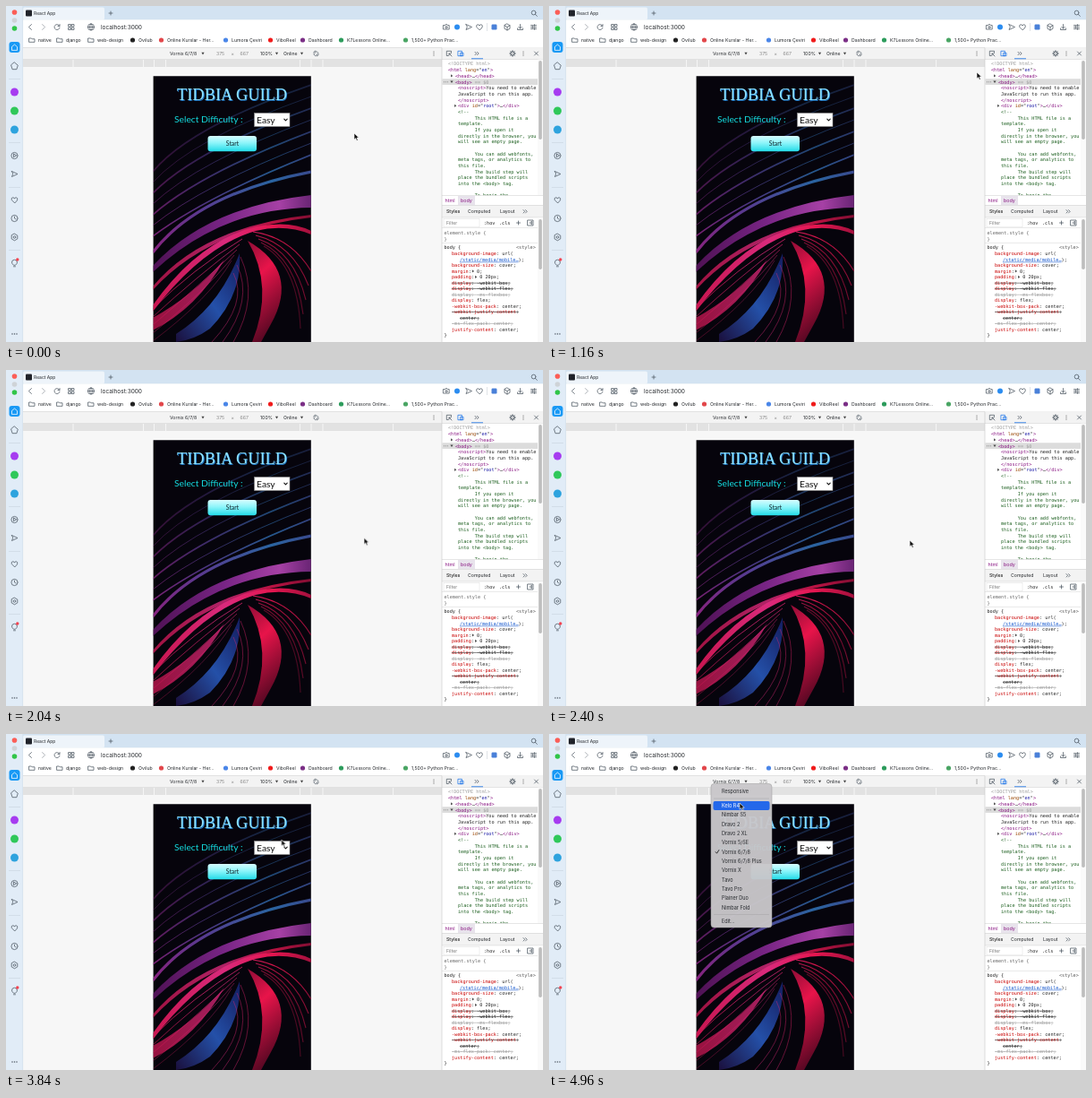
Recreate the animation shown at these times as an HTML page. Size 600 by 375 pixels, loop 5 s.

```html
<!DOCTYPE html>
<html lang="en">
<head>
<meta charset="utf-8">
<title>React App</title>
<style>
html, body { margin: 0; width: 100%; height: 100%; overflow: hidden; background: #f7f7f7; }
svg { display: block; width: 100vw; height: 100vh; }
text { font-family: Inter, Roboto, sans-serif; white-space: pre; }
.mono { font-family: "DejaVu Sans Mono", monospace; }
.serif { font-family: "Liberation Serif", serif; }
.hand { font-family: Lato, sans-serif; }
.icon { fill: none; stroke: #4b5661; stroke-width: .75; stroke-linecap: round; stroke-linejoin: round; }
.tag { fill: #881280; } .attr { fill: #994500; } .val { fill: #1a1aa6; }
.note { fill: #1c5f1f; } .prop { fill: #c80000; } .dim { fill: #9a9a9a; }
.off { text-decoration: line-through; }
.link { fill: #1155cc; text-decoration: underline; }

#cursor { animation: move 5s linear infinite; }
#arrow, #hand, #menu, .hot { animation: 5s step-end infinite; }
#arrow { animation-name: arrow; }
#hand { animation-name: hand; }
#menu { animation-name: menu; }
.hot0 { animation-name: hot0; }
.hot1 { animation-name: hot1; }
@keyframes move {
  0%, 8% { transform: translate(389px, 142px); animation-timing-function: ease-in-out; }
  23.2% { transform: translate(478px, 74px); animation-timing-function: ease-in-out; }
  32% { transform: translate(392px, 180px); animation-timing-function: ease-out; }
  48% { transform: translate(403px, 190px); }
  64.8% { transform: translate(407px, 192px); animation-timing-function: ease-in-out; }
  88% { transform: translate(220px, 52.5px); }
  99.2%, 100% { transform: translate(213px, 77px); }
}
@keyframes hand { 0% { opacity: 0; } 86.4% { opacity: 1; } 91.2% { opacity: 0; } }
@keyframes arrow { 0% { opacity: 1; } 86.4% { opacity: 0; } 91.2% { opacity: 1; } }
@keyframes menu { 0% { opacity: 0; } 91.2% { opacity: 1; } }
@keyframes hot0 { 0% { opacity: 0; } 91.6% { opacity: 1; } 95.6% { opacity: 0; } }
@keyframes hot1 { 0% { opacity: 0; } 98.2% { opacity: 1; } }
</style>
</head>
<body>
<svg viewBox="0 0 600 375">
  <defs>
    <clipPath id="screen"><rect x="164.6" y="78.2" width="176.2" height="296.8"/></clipPath>
    <clipPath id="dom"><rect x="487" y="59" width="113" height="152.5"/></clipPath>
    <linearGradient id="violet" gradientUnits="userSpaceOnUse" x1="165" x2="341">
      <stop stop-color="#8c2585"/><stop offset=".3" stop-color="#5d3c96"/><stop offset=".75" stop-color="#2c69a8"/><stop offset="1" stop-color="#3c4d95"/>
    </linearGradient>
    <linearGradient id="rose" gradientUnits="userSpaceOnUse" x1="165" x2="341">
      <stop stop-color="#c81650"/><stop offset=".45" stop-color="#d92a7c"/><stop offset=".75" stop-color="#e61650"/><stop offset="1" stop-color="#a3103d"/>
    </linearGradient>
    <linearGradient id="band" gradientUnits="userSpaceOnUse" x1="165" x2="341">
      <stop stop-color="#5c1462"/><stop offset=".45" stop-color="#8d2b9b"/><stop offset=".8" stop-color="#c24bc0"/><stop offset="1" stop-color="#7a2a86"/>
    </linearGradient>
    <linearGradient id="blue" x1="1" x2="0" y2="1">
      <stop stop-color="#141c5e"/><stop offset=".5" stop-color="#2450a8"/><stop offset="1" stop-color="#1a0f3c"/>
    </linearGradient>
    <linearGradient id="crimson" x2=".3" y2="1">
      <stop stop-color="#8e0d36"/><stop offset=".4" stop-color="#e8144a"/><stop offset="1" stop-color="#5c0824"/>
    </linearGradient>
    <linearGradient id="button" x2="0" y2="1">
      <stop stop-color="#d6fdff"/><stop offset=".45" stop-color="#8df5fa"/><stop offset="1" stop-color="#22dbe8"/>
    </linearGradient>
  </defs>
  <g id="browser"></g>
  <g id="phone"></g>
  <g id="tools"></g>
  <g id="menu"></g>
  <g id="cursor">
    <path id="arrow" d="M0 0V7.2L1.7 5.6 2.9 8.3 4.2 7.7 3 5.1H5.3Z" fill="#111" stroke="#fff" stroke-width=".6"/>
    <path id="hand" d="M0 .6Q.8-.4 1.5.6V3.3L4.8 4Q5.6 4.4 5.3 5.6L4.6 8H.6L-1.8 4.9Q-1.7 3.8-.6 4.5L0 5Z" fill="#fff" stroke="#222" stroke-width=".7"/>
  </g>
</svg>
<script>
const put = (id, ...parts) => { document.getElementById(id).innerHTML = parts.flat().join(''); };
const box = (x, y, w, h, fill, more = '') => `<rect x="${x}" y="${y}" width="${w}" height="${h}" fill="${fill}" ${more}/>`;
const dot = (x, y, r, fill) => `<circle cx="${x}" cy="${y}" r="${r}" fill="${fill}"/>`;
const icon = (x, y, d, more = '') => `<path class="icon" transform="translate(${x} ${y})" d="${d}" ${more}/>`;
// y is the middle of the line
const text = (x, y, s, size = 5.2, fill = '#25282c', more = '') =>
  `<text x="${x}" y="${y + size * .36}" font-size="${size}" fill="${fill}" ${more}>${s}</text>`;
const mono = (x, y, s, fill = '#222') => text(x, y, s, 5.2, fill, 'class="mono"');
const span = (c, s) => `<tspan class="${c}">${s}</tspan>`;
const tag = s => span('tag', `&lt;${s}&gt;`);
const down = (x, y, fill = '#444') => `<path d="M${x - 1.6} ${y - 1.2}h3.2l-1.6 2.6z" fill="${fill}"/>`;
const right = (x, y) => `<path d="M${x - 1} ${y - 1.6}v3.2l2.4-1.6z" fill="#555"/>`;
const kebab = (x, y) => [-2, 0, 2].map(d => dot(x, y + d, .6, '#555')).join('');

const ring = 'M3.6 0A3.6 3.6 0 1 1-3.6 0A3.6 3.6 0 1 1 3.6 0';
const heart = 'M0 3.2L-3.2 0Q-4-2.6-1.8-2.8Q-.4-2.8 0-1.4Q.4-2.8 1.8-2.8Q4-2.6 3.2 0Z';
const plane = 'M-3-3L3.5 0-3 3-1.8 0Z';
const more = 'M-2-1.7L-.3 0-2 1.7M.5-1.7L2.2 0 .5 1.7';
const folder = 'M-3-2H-.8L0-1.2H3V2.3H-3Z';

const bookmarks = [
  [36, 'native'], [67, 'django'], [102, 'web-design'], [148, 'Ovilub', '#222'],
  [180, 'Online Kurslar - Her...', '#e2474b'], [252, 'Lumora Çeviri', '#4a86e8'],
  [302, 'ViboReel', '#f01c1c'], [338, 'Dashboard', '#7b2f86'],
  [381, 'K7Lessons Online...', '#2d9c5c'], [453, '1,500+ Python Prac...', '#4aa564']
].map(([x, name, color]) =>
  (color ? dot(x - 6.5, 38, 2.6, color) : icon(x - 7, 38, folder)) + text(x, 38, name, 5.2));

put('browser',
  box(0, 0, 600, 375, '#f7f7f7'),
  box(19, 0, 581, 15.5, '#d3e3f2'), box(19, 1.5, 91, 14, '#eef4fa', 'rx="2"'),
  box(22, 4.5, 7, 7, '#20232a', 'rx="1"'),
  text(31, 8, 'React App', 5), icon(117, 8, 'M-2 0H2M0-2V2'),
  icon(590, 8, 'M2-.5A2.4 2.4 0 1 1-2.8-.5A2.4 2.4 0 1 1 2-.5M1.4 1.3L3.4 3.3'),
  box(19, 15.5, 581, 31, '#fff'),
  icon(27, 23.5, 'M1.5-3L-1.5 0 1.5 3'), icon(42, 23.5, 'M-1.5-3L1.5 0-1.5 3', 'opacity=".55"'),
  icon(57, 23.5, 'M2.8-1.2A3 3 0 1 0 3 .7M3-3V-1H1'),
  icon(73, 23.5, 'M-3-3H-.6V-.6H-3ZM.6-3H3V-.6H.6ZM-3 .6H-.6V3H-3ZM.6 .6H3V3H.6Z'),
  icon(95, 23.5, ring + 'M-3.6 0H3.6M0-3.6Q-3 0 0 3.6Q3 0 0-3.6'),
  text(106, 23.5, 'localhost:3000', 6.5),
  icon(492, 23.5, 'M-3.2-2H-1.5L-1-2.8H1L1.5-2H3.2V2.5H-3.2ZM1.2 .3A1.2 1.2 0 1 1-1.2 .3A1.2 1.2 0 1 1 1.2 .3'),
  dot(504, 23.5, 3, '#2b8cf0'), icon(517, 23.5, plane), icon(529, 23.5, heart),
  box(537, 19, .6, 9, '#ccd2d8'), box(542.5, 20.5, 6, 6, '#4a80d8', 'rx="1.2"'),
  icon(560, 23.5, 'M0-3.5L3-1.8V1.8L0 3.5-3 1.8V-1.8ZM-3-1.8L0 0 3-1.8M0 0V3.5'),
  icon(574.5, 23.5, 'M0-3V1.5M-1.8-.2L0 1.6 1.8-.2M-3 1.5V3H3V1.5'),
  icon(589.5, 23.5, 'M-3-2H3M-3 0H3M-3 2H3M1-2.8V-1.2M-1-.8V.8M1 1.2V2.8'),
  bookmarks,
  box(0, 0, 19, 375, '#e1ecf7'), box(18.5, 0, .6, 375, '#cfdbe7'),
  dot(9.5, 7, 2.8, '#fb5e57'), dot(9.5, 16, 2.8, '#cfd3d7'), dot(9.5, 25, 2.8, '#31c548'),
  box(3.5, 40, 12, 12, '#1899f5', 'rx="3"'),
  icon(9.5, 46, 'M-3 3V-.5L0-3 3-.5V3Z', 'style="stroke:#fff"'),
  icon(9.5, 67, 'M0-4L3.8-.8 2.4 3.7H-2.4L-3.8-.8Z'),
  box(3, 81, 13, .6, '#c8d4e0'),
  dot(9.5, 96, 4.5, '#a63cf0'), dot(9.5, 117, 4.5, '#2fc85a'), dot(9.5, 138, 4.5, '#2ea3de'),
  box(3, 152, 13, .6, '#c8d4e0'),
  icon(9.5, 167, ring + 'M-1-1.7V1.7L1.8 0Z'), icon(9.5, 187.5, plane),
  box(3, 202, 13, .6, '#c8d4e0'),
  icon(9.5, 216.5, heart), icon(9.5, 237, ring + 'M0-2V0L1.6 1'),
  icon(9.5, 258, 'M0-3.8L3.3-1.9V1.9L0 3.8-3.3 1.9V-1.9ZM1.3 0A1.3 1.3 0 1 1-1.3 0A1.3 1.3 0 1 1 1.3 0'),
  box(3, 272, 13, .6, '#c8d4e0'),
  icon(9.5, 287, 'M-1.3 2Q-3 .5-3-1Q-2.8-3.7 0-3.8Q2.8-3.7 3-1Q3 .5 1.3 2ZM-1 3.8H1'),
  dot(12.8, 283, 1.7, '#f3414e'),
  [7, 9.5, 12].map(x => dot(x, 366, .75, '#4b5661')),

  box(19, 46.5, 468, 13, '#f3f3f3'), box(19, 46, 581, .6, '#d4d4d4'),
  text(183, 53, 'Vornix 6/7/8'), down(220, 53),
  text(235, 53, '375', 5.2, '#888'), text(251.5, 53, '×', 5.2, '#888'), text(261.5, 53, '667', 5.2, '#888'),
  text(284, 53, '100%'), down(302.5, 53), text(310, 53, 'Online'), down(330.5, 53),
  icon(346.5, 53, 'M-2.5 .5L.5-2.5 2.5-.5-.5 2.5ZM-2.8-1Q-2.4-2.7-.8-2.9M2.8 1Q2.4 2.7 .8 2.9'),
  kebab(478, 53),
  box(19, 59.5, 468, 8.5, '#e2e2e2'), box(19, 59.2, 468, .5, '#d6d6d6'),
  [74.5, 153, 165, 178, 328, 340.5, 353.5, 432].map(x => box(x, 60, 1, 8, '#f5f5f5'))
);

const curve = (d, paint, width, opacity = 1) =>
  `<path d="${d}" fill="none" stroke="url(#${paint})" stroke-width="${width}" opacity="${opacity}"/>`;
const shape = (d, paint, opacity = 1) => `<path d="${d}" fill="url(#${paint})" opacity="${opacity}"/>`;
const repeat = (n, f) => Array.from({ length: n }, (_, i) => f(i));

const wallpaper = [
  box(164, 78, 177, 297, '#06040c'),
  // wide arcs
  repeat(7, i => curve(`M164 ${185 + i * 12}Q${205 + i * 3} ${135 + i * 13} 341 ${88 + i * 13}`,
    'violet', i % 2 ? .8 : 1.7, .35 + i * .08)),
  curve('M164 275Q215 209 341 185', 'violet', 3.2, .95),
  shape('M164 290Q225 224 341 211V225Q240 226 164 297Z', 'band', .85),
  shape('M164 313Q220 246 341 233V236Q226 249 164 317Z', 'rose', .8),
  // folds below the arcs
  shape('M164 334Q215 262 280 246Q318 239 341 251V255Q312 243 279 251Q220 268 164 341Z', 'rose'),
  shape('M164 348Q208 324 244 283Q214 337 164 362Z', 'rose', .75),
  repeat(5, i => curve(`M164 ${338 + i * 9}Q${208 + i * 5} ${294 + i * 8} ${264 - i * 3} ${260 + i * 6}`, 'rose', .9, .85 - i * .12)),
  shape('M190 366Q238 336 261 276Q264 323 228 360Q210 373 190 375Z', 'blue'),
  shape('M270 262Q329 296 296 355L285 375H275Q300 313 270 262Z', 'crimson'),
  repeat(5, i => curve(`M${276 + i * 3} ${252 + i * 4}Q${318 + i * 2} ${258 + i * 8} ${341 - i * 3} ${296 + i * 16}`, 'rose', 1.1, .9 - i * .13)),
  repeat(3, i => curve(`M${262 - i * 4} ${280 + i * 9}Q${283 - i * 6} ${325 + i * 3} ${254 - i * 12} 375`, 'rose', .8, .55))
];
const title = (dx, fill) => text(191 + dx, 98.5 + dx, 'TIDBIA GUILD', 18.4, fill, 'class="serif"');

put('phone', '<g clip-path="url(#screen)">', wallpaper.flat(), '</g>',
  title(.8, '#1d78c8'), title(0, '#8fe3ff'),
  text(188, 126.5, 'Select Difficulty :', 10.3, '#15dce0', 'class="hand"'),
  box(277.5, 119.5, 39.5, 15, '#fff', 'stroke="#8a8a8a" stroke-width=".6"'),
  text(280, 127, 'Easy', 10.3, '#111', 'class="hand"'),
  icon(312.5, 127, 'M-1.7-.9L0 .9 1.7-.9', 'style="stroke:#111;stroke-width:1.1"'),
  box(225.5, 145, 54.5, 17.3, 'url(#button)', 'rx="3"'),
  text(253, 153.6, 'Start', 6.8, '#102027', 'class="hand" text-anchor="middle"'));

const domY = i => 64.6 + i * 6.68;
const dom = [
  [494, span('dim', '&lt;!DOCTYPE html&gt;')],
  [494, span('tag', '&lt;html ') + span('attr', 'lang') + '="' + span('val', 'en') + '"' + span('tag', '&gt;')],
  [502, tag('head') + '…' + tag('/head')],
  [502, tag('body') + span('dim', ' == $0')],
  [505, tag('noscript') + 'You need to enable'],
  [505, 'JavaScript to run this app.'],
  [505, tag('/noscript')],
  [505, span('tag', '&lt;div ') + span('attr', 'id') + '="' + span('val', 'root') + '"' + span('tag', '&gt;') + '…' + tag('/div')],
  ...['&lt;!--', '      This HTML file is a', 'template.', '      If you open it',
    'directly in the browser, you', 'will see an empty page.', '',
    '      You can add webfonts,', 'meta tags, or analytics to', 'this file.',
    '      The build step will', 'place the bundled scripts', 'into the &lt;body&gt; tag.', '',
    '      To begin the'].map(s => [505, span('note', s)])
].map(([x, s], i) => mono(x, domY(i), s));

const rule = (name, value) => span('prop', name) + ': ' + value + ';';
const off = (s, c = '') => span('off ' + c, s);
const styles = [
  [498, span('prop', 'background-image') + ': url('],
  [507, span('link', '/static/media/mobile…') + ');'],
  [498, rule('background-size', 'cover')],
  [498, span('prop', 'margin') + ':  0;'],
  [498, span('prop', 'padding') + ':  0 20px;'],
  [498, off(rule('display', '-webkit-box'))],
  [498, off(rule('display', '-webkit-flex'))],
  [498, off('display: -ms-flexbox;', 'dim')],
  [498, rule('display', 'flex')],
  [498, rule('-webkit-box-pack', 'center')],
  [498, off(span('prop', '-webkit-justify-content') + ':')],
  [507, off('center;')],
  [498, off('-ms-flex-pack: center;', 'dim')],
  [498, rule('justify-content', 'center')],
  [489.5, '}']
].map(([x, s], i) => mono(x, 276.3 + i * 6.52, s));

put('tools',
  box(487, 46.5, 113, 328.5, '#fff'), box(487, 46.5, 113, 13, '#f3f3f3'),
  icon(495, 53, 'M2.5-.8V-2.7H-2.7V2.5H-.8M0 0L3 3M0 2V0H2'),
  icon(508, 53, 'M-2.7-2.7H1.4V2.7H-2.7ZM0-.7H3V2.7H0Z', 'style="stroke:#1a73e8"'),
  box(520, 58.4, 13, 1, '#1a73e8'), icon(526, 53, more),
  icon(566, 53, 'M2.4 0A2.4 2.4 0 1 1-2.4 0A2.4 2.4 0 1 1 2.4 0M0-3.3V3.3M-3.3 0H3.3M-2.3-2.3L2.3 2.3M-2.3 2.3L2.3-2.3'),
  dot(566, 53, 1, '#f3f3f3'), kebab(578, 53), icon(592.5, 53, 'M-2-2L2 2M-2 2L2-2'),
  box(487, 59.2, 113, .5, '#ccc'), box(487.5, domY(3) - 3.4, 107, 6.7, '#dcdcdc'),
  '<g clip-path="url(#dom)">', dom, '</g>',
  [489.5, 491.5, 493.5].map(x => dot(x, domY(3), .5, '#777')),
  right(498, domY(2)), down(498, domY(3)), right(502, domY(7)),
  box(594, 59.7, 6, 152, '#fafafa'), box(595.2, 61, 3.6, 88, '#bdbdbd', 'rx="1.8"'),
  box(487, 211.5, 113, 10.5, '#fff'), box(487, 211.5, 113, .5, '#ccc'),
  box(505, 212, 19, 10, '#e8e3ec'),
  text(490.5, 217, 'html', 5.4, '#881280'), text(508, 217, 'body', 5.4, '#881280'),
  box(487, 222, 113, 14, '#f3f3f3'), box(487, 222, 113, .5, '#ccc'), box(487, 235.7, 113, .5, '#ccc'),
  text(492, 229.3, 'Styles', 5.2, '#222', 'font-weight="500"'), text(516, 229.3, 'Computed'), text(552, 229.3, 'Layout'),
  icon(580, 229.3, more),
  box(489, 237.3, 40, 9.5, '#fff', 'stroke="#ddd" stroke-width=".5"'),
  text(492, 242, 'Filter', 5.2, '#777'), mono(534, 242, ':hov'), mono(551, 242, '.cls'),
  icon(572.5, 242, 'M-2 0H2M0-2V2'), icon(586, 242, 'M-3-3H3V3H-3ZM1.2-1.5L-.8 0 1.2 1.5Z'),
  box(487, 247.5, 107, .5, '#d5d5d5'),
  mono(489.5, 253, 'element.style {', '#666'), mono(489.5, 260, '}', '#666'),
  box(487, 264, 107, .5, '#d5d5d5'),
  mono(489.5, 269.5, 'body {'), mono(570, 269.5, '&lt;style&gt;', '#555'),
  styles, right(521.8, 295.9), right(525, 302.4),
  box(594, 236.2, 6, 139, '#fafafa'), box(595.2, 238, 3.6, 56, '#bdbdbd', 'rx="1.8"'),
  box(486.7, 46.5, .6, 328.5, '#c8c8c8'));

const devices = ['Kelo R4', 'Nimbar S5', 'Dravo 2', 'Dravo 2 XL', 'Vornix 5/SE', 'Vornix 6/7/8',
  'Vornix 6/7/8 Plus', 'Vornix X', 'Tavo', 'Tavo Pro', 'Plainer Duo', 'Nimbar Fold'];
const item = (y, s, fill) => text(193, y, s, 5.5, fill);
const hot = (n, y, s) =>
  `<g class="hot hot${n}">${box(183.5, y - 4.9, 63, 9.8, '#2468ea', 'rx="2"')}${item(y, s, '#fff')}</g>`;

put('menu',
  box(181, 55.5, 68, 160.5, '#c9c7ca', 'rx="3.5" fill-opacity=".96" stroke="#999" stroke-width=".5"'),
  item(64.5, 'Responsive'), devices.map((s, i) => item(80 + i * 10.33, s)), item(209, 'Edit...'),
  [71.7, 201.3].map(y => box(184, y, 62, .6, '#aaa8ab')),
  icon(188, 131.5, 'M-1.8 .2L-.5 1.7 1.9-2', 'style="stroke:#222;stroke-width:.9"'),
  hot(0, 64.5, 'Responsive'), hot(1, 80, devices[0]));
</script>
</body>
</html>
```
